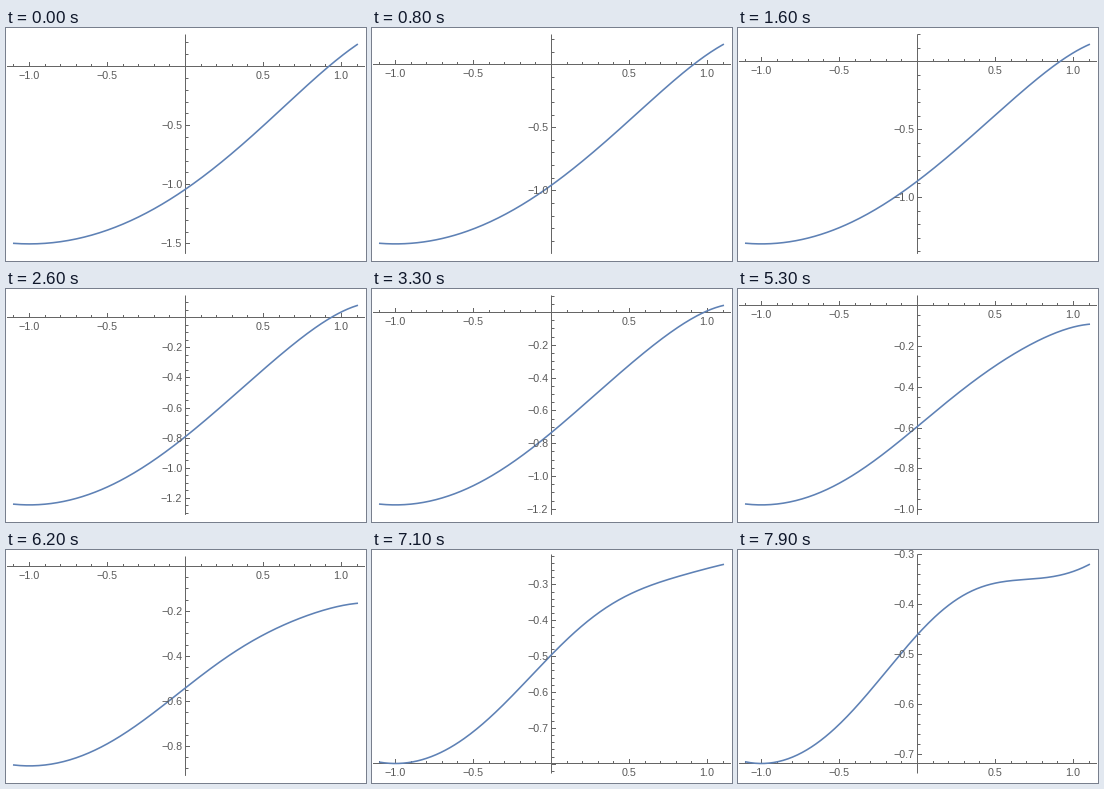
Write a matplotlib script that moves like this. It is 360 px wide and 233 px high and loops after 8000 ms.

```python
import numpy as np
import matplotlib.pyplot as plt
from matplotlib.animation import FuncAnimation
from matplotlib.collections import LineCollection

W, H, DPI = 360, 233, 100
PX = 72 / DPI
FRAMES, INTERVAL = 80, 100
BLUE = (0.368, 0.507, 0.710)
GRAY = "0.4"
X0, XSCALE = 179.5, 156.1
X = np.linspace(-1.1, 1.1, 221)

fig = plt.figure(figsize=(W / DPI, H / DPI), dpi=DPI, facecolor="white")
ax = fig.add_axes([0, 0, 1, 1])


def curve(s):
    """Height over X at progress s: a valley at x = -1 that lifts and flattens."""
    u = np.abs(X + 1)
    floor = -1.5 + 0.781 * s
    start = 0.467 - 0.00435 * u**4
    end = 0.08 + 0.245 * np.exp(-0.315 * u**3.1)
    bulge = 0.275 - 0.0109 * u**4
    return floor + u**2 * ((1 - s) * start + s * end + s * (1 - s) * bulge)


def crisp(v):
    return np.floor(v) + 0.5


def to_x(x):
    return X0 + XSCALE * x


def ticks(lo, hi, step, parts):
    """Yield (value, is_major) for every tick between lo and hi."""
    minor = step / parts
    for n in range(int(np.ceil(lo / minor)), int(np.floor(hi / minor)) + 1):
        yield n * minor, n % parts == 0


def label(x, y, value, align):
    text = f"{value:.1f}".replace("-", "\u2212")
    ax.text(x, y + 3.4, text, ha=align, va="baseline", color="0.35",
            family="Liberation Sans", size=10.7 * PX)


def draw(k):
    ax.clear()
    ax.set(xlim=(0, W), ylim=(H, 0))
    ax.axis("off")

    y = curve(k / (FRAMES - 1))
    lo, hi = y.min(), y.max()
    # The horizontal axis sits at zero unless zero is too far away.
    at_zero = hi > 0.2 * lo
    if at_zero:
        hi = max(hi, 0)
    top, bottom = (16.5, 215.9) if at_zero else (14.5, 213.5)
    scale = (bottom - top) / (hi - lo)

    def to_y(v):
        return top + (hi - v) * scale

    base = crisp(to_y(0 if at_zero else lo))
    pad = 0.05 * (hi - lo)
    lines = [[(1, base), (359, base)],
             [(X0, top - 10), (X0, bottom + 10)]]

    for v, major in ticks(-1.145, 1.145, 0.5, 5):
        if v == 0:
            continue
        x = crisp(to_x(v))
        lines.append([(x, base), (x, base - (4.5 if major else 2.5))])
        if major:
            label(x - 0.5, base + 9, v, "center")

    span = hi - lo + 2 * pad
    step, parts = next(((s, p) for s, p in ((.1, 5), (.2, 4)) if span / s < 7.8),
                       (.5, 5))
    for v, major in ticks(lo - pad, hi + pad, step, parts):
        ty = crisp(to_y(v))
        lines.append([(X0, ty), (X0 + (4.5 if major else 3), ty)])
        if major and abs(ty - base) > 4:
            label(176.3, ty, v, "right")

    # Positions already fall on pixel centres, so snapping would shift them.
    ax.add_collection(LineCollection(lines, colors=GRAY, linewidths=PX,
                                     capstyle="butt", snap=False))
    ax.plot(to_x(X), to_y(y), color=BLUE, lw=1.6 * PX)
    return []


anim = FuncAnimation(fig, draw, frames=FRAMES, interval=INTERVAL,
                     repeat=True, repeat_delay=0)
plt.show()
```
